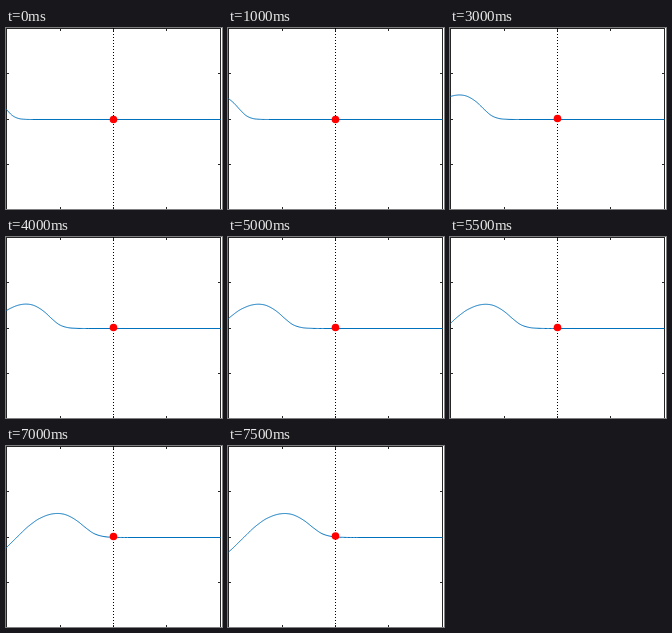
Animation, 216 px wide and 181 px high, one loop 8 s. Source, as an HTML page with a canvas:

```html
<!DOCTYPE html>
<html lang="en">
<head>
<meta charset="utf-8">
<title>Travelling wave</title>
<style>
  html, body { margin: 0; width: 100%; height: 100%; overflow: hidden; background: #fff; }
  canvas { display: block; }
</style>
</head>
<body>
<canvas id="stage" width="216" height="181"></canvas>
<script>
const ctx = document.getElementById('stage').getContext('2d');
const LOOP = 8000, STEP = 500;
const LEFT = 0, RIGHT = 214, MID = 107, BASE = 91;

// Displacement of the left end, every half second from -2 s to 8 s
const DRIVE = [0, 0.15, 1, 4, 10, 16.3, 20.8, 23.6, 24.6, 24.3, 23,
  20.8, 18, 14.2, 10, 5.1, 0, -5, -10, -14.5, -18];

function drive(s) {
  const pos = (s + 2) * 2, i = Math.floor(pos), f = pos - i;
  const at = n => DRIVE[Math.max(0, Math.min(DRIVE.length - 1, n))];
  const a = at(i - 1), b = at(i), c = at(i + 1), d = at(i + 2);
  return b + f * (c - a + f * (2 * a - 5 * b + 4 * c - d + f * (3 * (b - c) + d - a))) / 2;
}

// The front runs a little faster than the crest behind it
function speed(s) {
  return 10.1 + 2.7 * Math.exp(-(s + 1.5) / 1.9);
}

function rect(x, y, w, h) {
  ctx.fillRect(x, y, w, h);
}

function drawAxes() {
  ctx.fillStyle = '#fff';
  rect(0, 0, 216, 181);
  ctx.fillStyle = '#262626';
  rect(LEFT, 0, RIGHT + 1, 1);
  rect(LEFT, 0, 1, 181);
  rect(RIGHT, 0, 1, 181);
  for (const x of [54, 107, 160]) {
    rect(x, 1, 1, 2);
    rect(x, 179, 1, 2);
  }
  for (const y of [45, 91, 136]) {
    rect(1, y, 2, 1);
    rect(RIGHT - 2, y, 2, 1);
  }
  ctx.fillStyle = '#000';
  for (let y = 0; y < 181; y += 3) rect(MID, y, 1, 1);
}

function drawWave(t) {
  ctx.beginPath();
  for (let s = t; s >= -2; s -= 0.05) {
    const age = t - s;
    ctx.lineTo(0.5 + speed(s) * age, BASE + 0.5 - drive(s) * (1 - 0.005 * age));
  }
  ctx.lineTo(RIGHT + 0.5, BASE + 0.5);
  ctx.strokeStyle = '#0072bd';
  ctx.lineWidth = 1;
  ctx.lineJoin = 'round';
  ctx.stroke();
}

function drawDot(t) {
  const lift = t < 2.5 ? 0 : t < 7.5 ? 1 : 1.5;
  ctx.fillStyle = '#f00';
  ctx.beginPath();
  ctx.arc(MID + 0.5, BASE + 0.5 - lift, 3.8, 0, Math.PI * 2);
  ctx.fill();
}

function draw(now) {
  const t = Math.floor((now % LOOP) / STEP) * STEP / 1000;
  drawAxes();
  drawWave(t);
  drawDot(t);
}

function tick() {
  draw(performance.now() - start);
  requestAnimationFrame(tick);
}

const start = performance.now();
tick();
</script>
</body>
</html>
```
